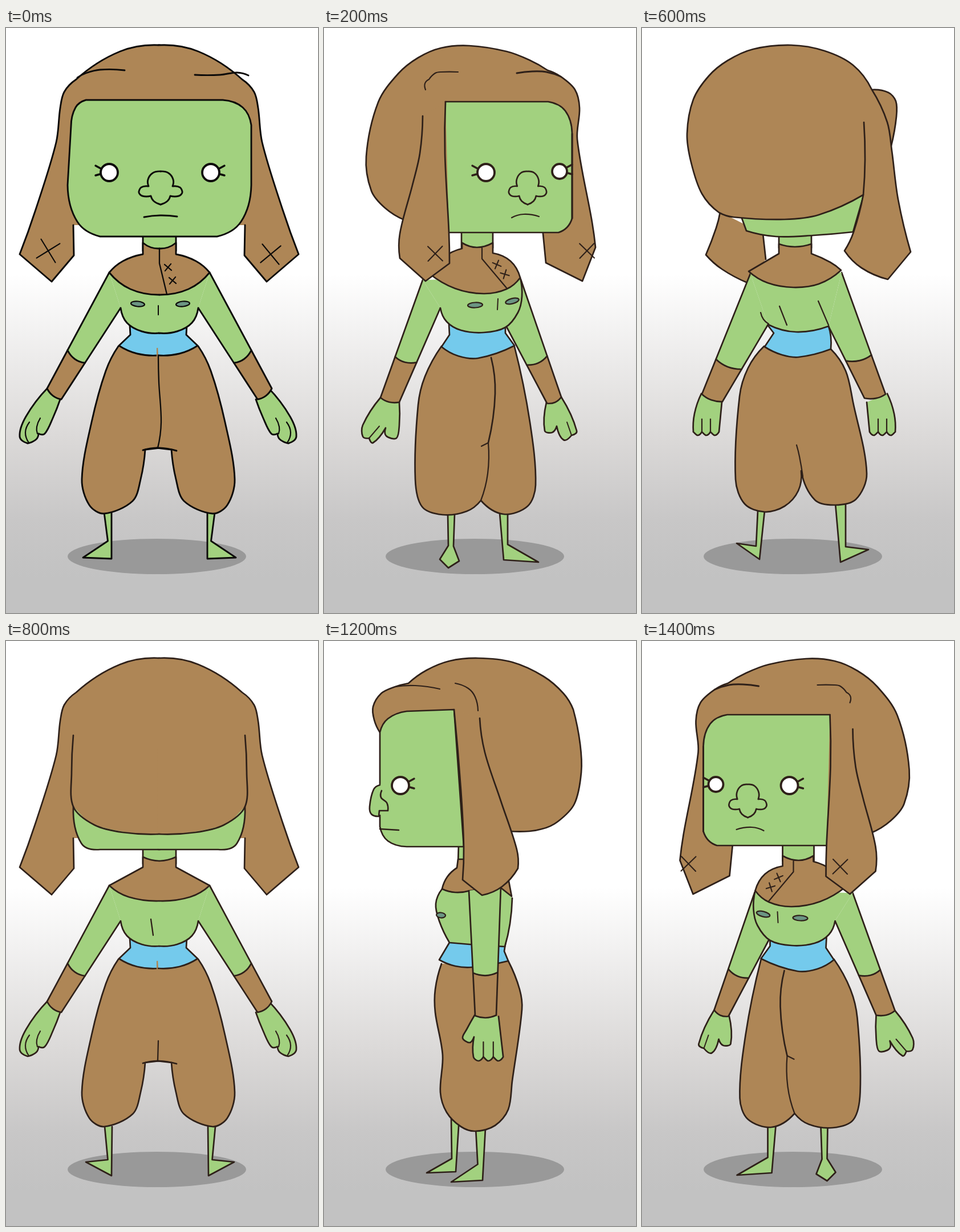
Recreate the animation shown at these times as an HTML page with a canvas. Size 547 by 1024 pixels, loop 1600 ms.

```html
<!DOCTYPE html>
<html lang="en">
<head>
<meta charset="utf-8">
<title>Character turnaround</title>
<style>
html, body { margin: 0; width: 100%; height: 100%; overflow: hidden; background: #fff; }
canvas { display: block; }
</style>
</head>
<body>
<canvas id="stage" width="547" height="1024"></canvas>
<script>
const ctx = document.getElementById('stage').getContext('2d');
const STEP = 200;
let ink, weight;

// Points "x,y x,y" form a smooth curve; "/" makes a corner.
function trace(text) {
  const path = new Path2D();
  let last = null;
  for (const part of text.split('/')) {
    const pts = part.trim().split(/\s+/).map(p => p.split(',').map(Number));
    if (last) pts.unshift(last);
    else path.moveTo(...pts[0]);
    addCurve(path, pts);
    last = pts[pts.length - 1];
  }
  return path;
}

// Spline whose handles follow the chords; end tangents mirror their neighbour.
function addCurve(path, p) {
  const n = p.length - 1;
  if (n < 1) return;
  const len = [], dir = [], tan = [];
  for (let i = 0; i < n; i++) {
    const dx = p[i + 1][0] - p[i][0], dy = p[i + 1][1] - p[i][1];
    len[i] = Math.hypot(dx, dy) || 1;
    dir[i] = [dx / len[i], dy / len[i]];
  }
  for (let i = 1; i < n; i++) {
    tan[i] = [0, 1].map(k => (p[i + 1][k] - p[i - 1][k]) / (len[i - 1] + len[i]));
  }
  const end = (d, t) => t ? d.map((v, k) => 2 * v - t[k]) : d;
  const first = end(dir[0], tan[1]), final = end(dir[n - 1], tan[n - 1]);
  tan[0] = first;
  tan[n] = final;
  for (let i = 0; i < n; i++) {
    const h = len[i] / 3, [ax, ay] = p[i], [bx, by] = p[i + 1], s = tan[i], e = tan[i + 1];
    path.bezierCurveTo(ax + s[0] * h, ay + s[1] * h, bx - e[0] * h, by - e[1] * h, bx, by);
  }
}

function line(text, w = weight) {
  ctx.strokeStyle = ink;
  ctx.lineWidth = w;
  ctx.stroke(trace(text));
}
// The outline is inked; the inner edge only bounds the fill.
function shape(color, outline, inner) {
  ctx.fillStyle = color;
  ctx.fill(trace(inner ? outline + ' / ' + inner : outline));
  line(outline);
}
const green = (outline, inner) => shape('#a2d17f', outline, inner);
const brown = (outline, inner) => shape('#ae8656', outline, inner);
const blue = (outline, inner) => shape('#74caec', outline, inner);

function flip(sum, draw) {
  ctx.save();
  ctx.transform(-1, 0, 0, 1, sum, 0);
  draw();
  ctx.restore();
}
function both(sum, draw) {
  draw();
  flip(sum, draw);
}

function cross(x, y, r, angle) {
  for (const a of [angle, angle + Math.PI / 2]) {
    const dx = r * Math.cos(a), dy = r * Math.sin(a);
    line(`${x - dx},${y - dy} ${x + dx},${y + dy}`, 2.1);
  }
}

function eye(x, y, r, side) {
  const near = x + side * (r - 2), far = x + side * (r + 9);
  line(`${near},${y - 6} ${far},${y - 12}`, 3.4);
  line(`${near},${y + 2} ${far},${y + 5}`, 3.4);
  ctx.beginPath();
  ctx.arc(x, y, r, 0, 7);
  ctx.fillStyle = '#fff';
  ctx.fill();
  ctx.lineWidth = 3.8;
  ctx.stroke();
}

function nose(x, k) {
  const at = (dx, y) => `${x + dx * k},${y}`;
  both(2 * x, () => green(
    [at(0, 251), at(14, 254), at(22, 265), at(21, 277)].join(' ') + ' / ' +
    [at(34, 279), at(38, 288), at(32, 294), at(17, 294)].join(' ') + ' / ' +
    [at(12, 303), at(0, 309)].join(' ')));
}

function patch(x, y, rx, tilt) {
  ctx.beginPath();
  ctx.ellipse(x, y, rx, 4.5, tilt, 0, 7);
  ctx.fillStyle = '#6b9583';
  ctx.fill();
  ctx.lineWidth = 2.2;
  ctx.strokeStyle = ink;
  ctx.stroke();
}

const mix = (a, b, t) => a.map((v, k) => v + (b[k] - v) * t);
const toward = (a, b, d) => mix(a, b, d / Math.hypot(b[0] - a[0], b[1] - a[1]));

// Green arm with a sleeve of fixed length above the wrist.
function arm(shoulder, pit, wristIn, wristOut, sleeve = 76) {
  const out = toward(wristOut, shoulder, sleeve), inn = toward(wristIn, pit, sleeve);
  const cuff = mix(out, inn, .5), wrist = mix(wristOut, wristIn, .5);
  brown(`${out} / ${wristOut} / ${toward(wrist, cuff, -4)} ${wristIn} / ${inn}`);
  green(`${shoulder} / ${out} / ${toward(cuff, wrist, 5)} ${inn} / ${pit}`);
}

function leg(x, thick, heel, toe, top, ankle) {
  green(`${x},${top} / ${heel} / ${toe} / ${heel[0] + thick / 2},${ankle} / ${x + thick},${top}`);
}

function fingers(x, y, w, n) {
  const dip = y - w * .4, tips = [];
  for (let i = 0; i < n; i++) {
    tips.push(`${x + i * w},${dip} ${x + (i + .5) * w},${y} ${x + (i + 1) * w},${dip}`);
  }
  return tips.join(' / ');
}
function fingerGaps(x, y, w, n) {
  for (let i = 1; i < n; i++) line(`${x + i * w},${y - w * .4} ${x + i * w},${y - w * 1.9}`, 2.2);
}

function backdrop() {
  const g = ctx.createLinearGradient(0, 0, 0, 1024);
  g.addColorStop(.42, '#fff');
  g.addColorStop(.7, '#dbd9d8');
  g.addColorStop(.84, '#c8c7c7');
  g.addColorStop(.94, '#c2c2c2');
  ctx.fillStyle = g;
  ctx.fillRect(0, 0, 547, 1024);
  ctx.fillStyle = '#999';
  ctx.beginPath();
  ctx.ellipse(264.5, 925, 156.5, 31, 0, 0, 7);
  ctx.fill();
}

function frontHood() {
  both(537, () => brown('270,30 200,41 123,90 / 102,112 95,140 88,200 52,318 24,396 / 80,444 / 119,398 / 118,345', '272,345'));
}

function frontBody() {
  both(534, () => {
    brown('197,557 175,600 150,690 133,790 146,835 172,850 222,828 236,790 244,738 / 270,735', '270,560');
    blue('267,573 230,570 198,556 / 218,537 / 217,520', '270,520');
  });
  line('240,739 268,735 299,740');
  both(533, () => {
    green('73,630 35,680 24,715 38,727 / 53,720 57,710 / 68,710 82,683 95,650');
    line('60,683 54,698 55,710', 2.2);
    line('41,690 34,708 40,726', 2.2);
  });
  both(538, () => {
    arm([181, 428], [201, 490], [97, 650], [72, 631]);
    green('201,490 212,516 238,531 270,534', '270,420 / 181,428');
    green('240,362 / 240,390', '270,390 / 270,362');
  });
}

function front() {
  ink = '#0c0a09';
  weight = 2.9;
  both(538, () => leg(185, -13, [185, 929], [135, 927], 848, 898));
  frontBody();
  line('267,574 268,620 272,690 266,735', 2.3);
  both(538, () => brown('269,386 254,384 240,376 / 240,396 / 205,408 181,428 / 218,457 269,467'));
  line('269,387 / 269,412 / 282,466', 2.3);
  cross(284, 419, 8, .7);
  cross(292, 442, 8, .7);
  both(541, () => patch(231, 483, 12, .1));
  line('267,486 267,502', 2);
  frontHood();
  line('125,87 140,79 165,73 208,74');
  line('331,82 375,82 405,78 425,83');
  cross(74, 390, 24, 1.02);
  cross(464, 396, 23, .88);
  green('140,126 / 380,126 / 415,139 430,170 / 430,275 / 412,339 370,365 / 165,365 / 125,339 108,275 / 114,172 / 122,139 140,126');
  both(540, () => eye(181, 253, 15, -1));
  nose(271, 1);
  line('242,331 270,328 300,330');
}

function back() {
  both(540, () => leg(186, -13, [185, 936], [140, 912], 850, 908));
  frontBody();
  line('267,700 266,735', 2.3);
  line('254,487 258,515', 2.3);
  both(538, () => brown('269,385 254,383 240,378 / 240,396 / 181,428 / 215,448 269,455'));
  frontHood();
  both(537, () => {
    green('270,365 / 165,365 / 132,354 118,290', '118,290 155,322 270,338');
    line('118,165 115,230 118,290 155,322 205,335 270,338');
  });
}

function quarter() {
  leg(308, 14, [315, 931], [376, 935], 849, 904);
  green('217,850 / 218,906 / 203,930 / 218,945 / 237,933 / 227,907 / 229,850');
  brown('206,557 177,610 165,660 160,790 172,838 208,852 250,846 275,827 / 315,851 357,837 371,800 361,690 334,558');
  line('293,577 300,640 288,726');
  line('276,732 288,726 / 287,780 275,827', 2.2);
  green('99,647 68,695 68,715 79,718 / 86,726 108,700 / 109,714 127,718 132,695 132,655');
  line('97,697 79,718', 2);
  green('390,655 387,705 400,708 408,697 / 420,721 434,713 / 443,705 416,646');
  line('426,690 434,713', 2);
  arm([173, 441], [204, 490], [132, 655], [99, 647]);
  arm([345, 440], [320, 523], [391, 657], [416, 646]);
  blue('219,518 / 220,537 / 206,558 / 235,574 270,578 334,556 / 318,534 / 318,520');
  green('204,490 215,514 240,529 280,533 318,524 340,498 347,470 344,437', '173,441');
  patch(265, 485, 13, -.05);
  patch(330, 478, 12, -.25);
  line('305,474 304,493', 2);
  green('241,355 / 241,385 / 296,385 / 296,355');
  brown('242,376 268,384 296,376 / 296,394 / 327,408 344,437 / 320,457 280,465 230,456 185,430 / 210,401 242,386 / 242,376');
  line('277,385 / 277,404 / 320,455', 2.2);
  cross(303, 414, 8, .4);
  cross(317, 431, 8, .3);
  brown('141,336 107,315 83,285 74,225 95,130 130,80 165,52 205,35 255,31 320,41 360,56 392,74 / 415,85 440,108 448,140 444,195 470,340 476,384 / 453,443 / 389,411 / 383,350', '215,350');
  line('338,79 365,76 390,77 415,85', 3);
  line('178,108 177,97 184,90 / 195,79 205,77 235,77', 2.2);
  green('213,129 / 393,129 / 423,145 435,185 / 435,333 / 426,349 411,358 / 219,358');
  eye(284, 253, 15, -1);
  eye(413, 251, 13, 1);
  line('435,185 / 435,333', 3);
  nose(357, .87);
  line('329,332 350,326 377,330', 2.2);
  brown('173,154 168,220 155,275 133,360 133,403 / 178,443 / 220,412 / 219,358 212,220 213,129');
  cross(195, 395, 18, .77);
  cross(461, 390, 18, .77);
}

function backQuarter() {
  brown('137,322 130,350 112,397 / 140,422 185,446', '217,405 / 212,360');
  line('212,360 217,405');
  brown('403,108 432,113 445,128 446,155 437,206');
  leg(215, -12, [206, 930], [166, 902], 845, 907);
  leg(339, 18, [348, 935], [397, 913], 832, 908);
  brown('214,557 186,595 171,645 164,790 180,833 215,847 250,837 274,810 279,775 / 303,826 338,835 375,825 394,780 370,655 357,600 331,562');
  line('271,730 276,750 282,785', 2.2);
  both(534, () => {
    green(`104,640 92,675 90,707 / ${fingers(90, 713, 15, 3)} / 140,655`);
    fingerGaps(90, 713, 15, 3);
  });
  arm([190, 430], [221, 519], [141, 654], [105, 641], 66);
  arm([350, 428], [327, 522], [390, 648], [427, 641], 73);
  blue('221,521 / 231,534 / 215,558 / 245,572 275,576 331,562 / 331,540 327,522');
  green('221,519 270,532 327,522', '350,428 / 190,430');
  line('208,498 213,510 222,518', 2.2);
  line('241,487 254,520', 2.2);
  line('309,478 327,520', 2.2);
  green('240,358 / 240,385 / 297,385 / 297,358');
  brown('240,378 268,383 297,378 / 297,395 / 330,410 349,424 / 310,448 265,454 220,446 187,426 / 240,395 / 240,378');
  green('175,333 / 183,355 / 235,365 300,363 370,357 / 390,288');
  brown('135,323 105,290 86,235 79,185 90,125 117,84 150,57 195,37 262,30 320,40 370,65 403,108 / 430,165 438,215 449,300 471,392 / 431,440 / 385,420 355,390 / 371,357 388,292 / 310,327 250,335 160,331 135,323');
  line('389,165 391,230 388,292');
}

function side() {
  leg(237, -14, [231, 929], [180, 931], 835, 906);
  leg(283, -17, [278, 944], [223, 947], 853, 916);
  brown('206,565 195,610 195,650 208,725 204,790 215,825 240,850 265,858 300,848 323,820 330,770 347,645 343,610 323,560');
  blue('221,526 / 202,558 / 230,569 260,571 323,560 / 316,543 / 318,530');
  green('207,434 196,460 202,490 220,528 / 255,531 / 317,535 / 326,495 330,450', '300,420');
  patch(205, 480, 8, .1);
  green('236,355 / 235,390', '250,390 / 250,355');
  brown('246,382 / 235,382 / 233,397 / 216,413 207,434 / 230,440 256,437 / 310,432 / 329,447 / 323,415');
  brown('98,160 88,138 86,115 100,92 122,81 148,74 / 180,51 220,35 270,30 330,37 385,62 420,92 437,120 / 449,180 451,230 439,285 410,316 382,329 / 360,333 325,333', '228,300 / 228,120');
  line('125,80 160,78 203,84', 2.2);
  line('230,74 253,83 265,98 270,122', 2.2);
  green('98,250 / 98,160 / 112,136 145,123 / 228,120 / 245,360 / 145,360 / 112,350 98,325 / 98,305');
  green('98,252 87,260 80,290 83,303 96,307 / 97,297 / 112,297 / 110,283 100,274 101,262');
  line('98,329 131,331');
  eye(134, 253, 15, 1);
  green(`264,655 250,680 243,695 255,703 263,693 / ${fingers(262, 735, 17.4, 3)} / 306,657`);
  fingerGaps(262, 735, 17.4, 3);
  arm([254, 437], [310, 430], [302, 655], [265, 656], 75);
  brown('273,135 282,195 310,280 338,365 340,398 / 312,430 277,445 / 243,418 / 245,360 240,260 228,120');
}

// Each pose, with the axis sum to mirror it around.
const poses = [[front], [quarter], [side, 546], [backQuarter], [back],
               [backQuarter, 551], [side], [quarter, 542.5]];
const start = performance.now();
let shown = -1;

function draw([pose, sum]) {
  ink = '#2e2019';
  weight = 2.7;
  ctx.lineCap = ctx.lineJoin = 'round';
  backdrop();
  if (sum) flip(sum, pose);
  else pose();
}

function frame() {
  const t = Math.max(0, performance.now() - start);
  const index = Math.floor(t / STEP) % poses.length;
  if (index !== shown) draw(poses[shown = index]);
  requestAnimationFrame(frame);
}
frame();
</script>
</body>
</html>
```
